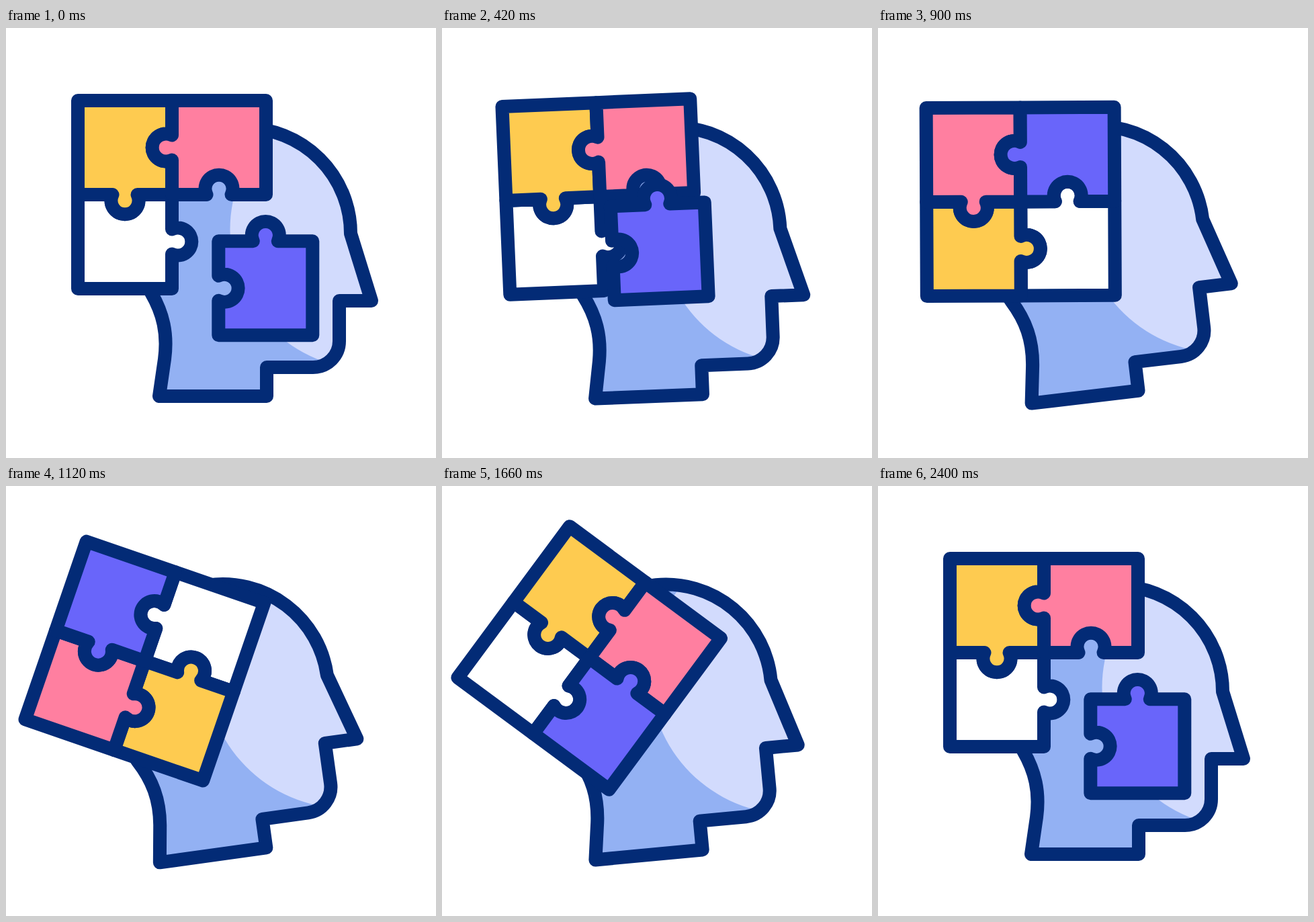
An HTML page that plays this animation: 640 px wide and 640 px high, repeating every 2420 ms.

```html
<!DOCTYPE html>
<html lang="en">
<head>
<meta charset="utf-8">
<title>Puzzle head</title>
<style>
  html, body { margin: 0; height: 100%; overflow: hidden; background: #fff; }
  svg { display: block; width: 100%; height: 100%; }
  .line { stroke: #032b76; stroke-width: 20; stroke-linejoin: round; stroke-linecap: round; }
</style>
</head>
<body>
<svg viewBox="0 0 640 640">
  <defs>
    <path id="outline" d="M228 548H388V505H457A39 39 0 0 0 496 466V406H544L513 306A157 157 0 0 0 199 306C199 345 204 372 216 394C234 425 241 455 236 493Z"/>
    <clipPath id="inside"><use href="#outline"/></clipPath>
  </defs>
  <g id="head">
    <use href="#outline" fill="#93b1f3"/>
    <circle cx="541.5" cy="300" r="208" fill="#d2dbfd" clip-path="url(#inside)"/>
    <use href="#outline" class="line" fill="none"/>
    <g id="board" class="line"></g>
  </g>
</svg>
<script>
const LOOP = 2420, HALF = 1200, STEP = 20;
const $ = id => document.getElementById(id);

// One side of a piece, drawn clockwise: kind 1 = tab, 0 = socket, null = straight
function side(dx, dy, kind) {
  if (kind === null) return `l${140 * dx} ${140 * dy}`;
  const flat = `l${51.5 * dx} ${51.5 * dy}`;
  return `${flat}a20.5 20.5 0 1 ${kind} ${37 * dx} ${37 * dy}${flat}`;
}

function addPiece(x, y, fill, top, right, bottom, left) {
  const path = document.createElementNS('http://www.w3.org/2000/svg', 'path');
  path.setAttribute('d', `M${x} ${y}` + side(1, 0, top) + side(0, 1, right) +
    side(-1, 0, bottom) + side(0, -1, left) + 'z');
  path.setAttribute('fill', fill);
  $('board').append(path);
  return path;
}

addPiece(107, 248, '#fff', 0, 1, null, null);
addPiece(107, 108, '#fecb50', null, 0, 1, null);
addPiece(247, 108, '#ff7fa0', null, null, 0, 1);
const loose = addPiece(247, 248, '#6965fa', 1, null, null, 0);

function ease(u) {
  u = Math.min(1, Math.max(0, u));
  return u * u * (3 - 2 * u);
}

function draw(now) {
  const t = Math.floor(now % LOOP / STEP) * STEP;
  const there = HALF - Math.abs(HALF - t); // out and back
  const gap = 69.3 * (1 - ease(there / 600));
  $('head').setAttribute('transform', `rotate(${-8 * ease(there / HALF)} 318 548)`);
  $('board').setAttribute('transform', `rotate(${-360 * ease((t - 400) / 1600)} 247 248)`);
  loose.setAttribute('transform', `translate(${gap} ${gap})`);
}

const start = performance.now();
function tick() {
  draw(performance.now() - start);
  requestAnimationFrame(tick);
}
tick();
</script>
</body>
</html>
```
